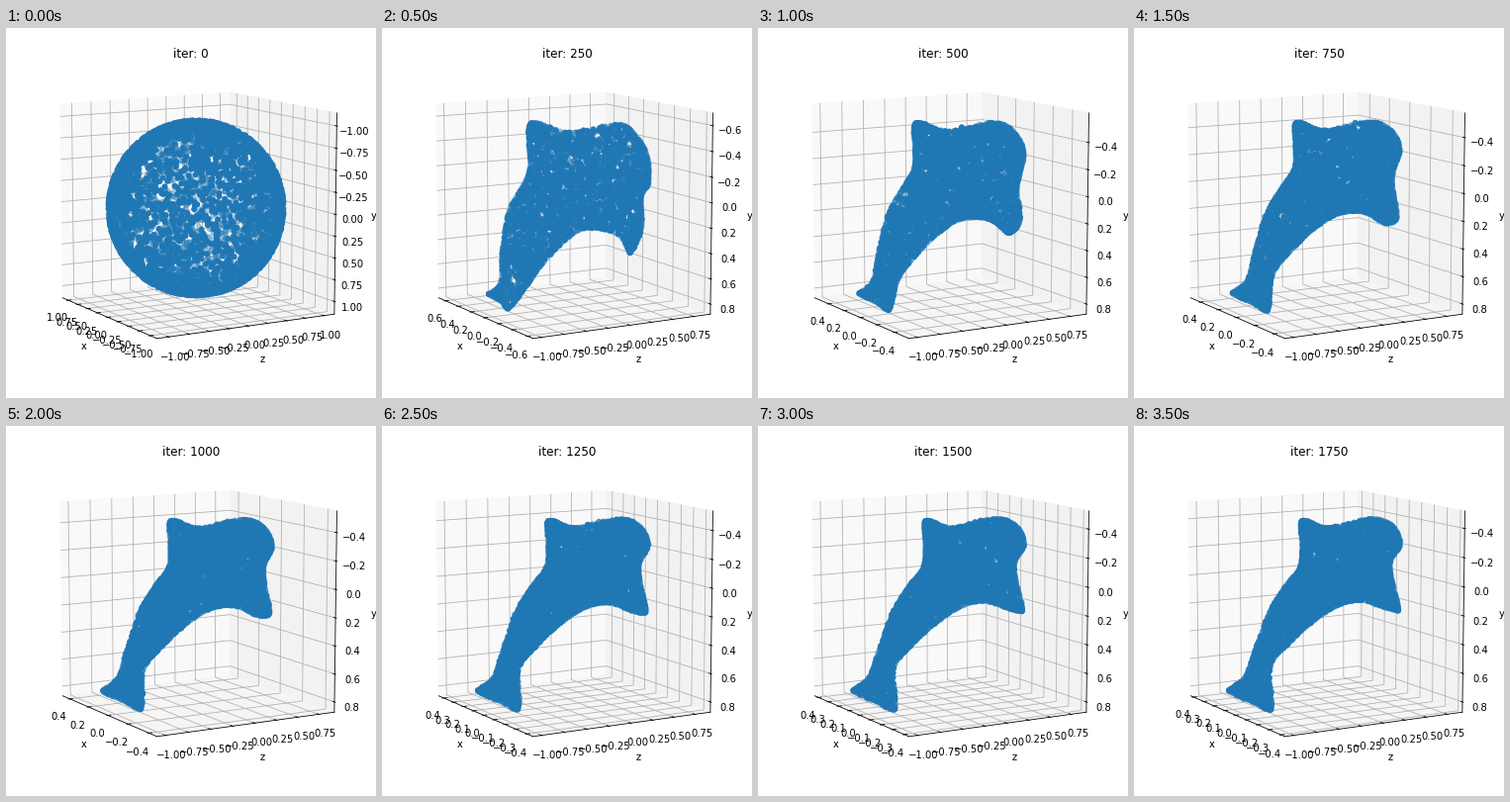
Animation, 374 px wide and 374 px high, one loop 4 s. Source, as a matplotlib script:

```python
import numpy as np
import matplotlib.pyplot as plt
from matplotlib.animation import FuncAnimation
from matplotlib.path import Path

SIZE, DPI, STEPS = 374, 72, 8
PAD, SCALE = 7.2, 360 / 0.185
EDGE = 0.5 + 1 / 48          # half side of the drawn box
DELTA = 1 / 12
BLUE = (31 / 255, 119 / 255, 180 / 255)
GRID = "#b0b0b0"

# limits of the x, z and y axes when the body first appears and when it settles
LIMITS_A = np.array([(-0.645, 0.68), (-1.045, 0.915), (-0.666, 0.849)])
LIMITS_B = np.array([(-0.415, 0.412), (-1.05, 0.893), (-0.491, 0.844)])

# key points of the body at the same two times, clockwise from the upper fin
BODY_A = np.array([
    (146, 99), (156, 93), (190, 103), (240, 95), (260, 109), (271, 130),
    (272, 158), (265, 171), (265, 204), (251, 230), (237, 211), (207, 205),
    (185, 218), (162, 243), (148, 263), (129, 286), (118, 278), (105, 269),
    (117, 257), (119, 225), (126, 184), (142, 155), (147, 140), (146, 120)])
BODY_B = np.array([
    (166, 97), (175, 93), (197, 100), (241, 91), (264, 100), (272, 120),
    (262, 138), (264, 158), (270, 187), (256, 187), (230, 179), (207, 184),
    (182, 200), (158, 222), (140, 245), (141, 288), (118, 281), (93, 268),
    (110, 252), (120, 225), (136, 184), (151, 160), (165, 142), (167, 120)])


def progress(step):
    """Settling of the body: fast at first, then ever slower."""
    return 1 - (1 - np.log(step) / np.log(STEPS - 1)) ** 1.4


def mix(a, b, t):
    return a + (b - a) * t


def view_axes(elev=190, azim=30):
    e, a = np.radians([elev, azim])
    n = np.array([np.cos(a) * np.cos(e), np.sin(a) * np.cos(e), np.sin(e)])
    u = np.cross([0, 0, -1], n)
    u /= np.linalg.norm(u)
    return u, np.cross(n, u), n


U, V, N = view_axes()


def project(points):
    """Perspective view of points in the unit cube centred on zero."""
    p = np.asarray(points, float)
    d = 10 - p @ N
    return np.stack([PAD + (p @ U / d + 0.095) * SCALE,
                     PAD + (p @ V / d + 0.095) * SCALE], -1), d


def line(points, color):
    q, _ = project(points)
    ax.plot(q[:, 0], q[:, 1], color=color, lw=0.8)


def label(point, text, va):
    q, _ = project(point)
    ax.text(q[0], q[1], text, fontsize=10, ha="center", va=va)


def pane(axis, side, gray):
    square = np.array([(-1, -1), (1, -1), (1, 1), (-1, 1)]) * EDGE
    q, _ = project(np.insert(square, axis, side * EDGE, axis=1))
    ax.fill(q[:, 0], q[:, 1], color=(gray,) * 3, lw=0.8)


def ticks(lo, hi):
    """Position along the box and text of every tick."""
    step = next(s for s in (0.1, 0.2, 0.25) if s >= (hi - lo) / 9)
    digits = 2 if step == 0.25 else 1
    for k in range(int(np.ceil(lo / step)), int(np.floor(hi / step)) + 1):
        text = f"{k * step:.{digits}f}".replace("-", "\u2212")
        yield (k * step - lo) / (hi - lo) - 0.5, text


def draw_axis(i, name, out, tick_dir, limits):
    """Axis i on the box edge that lies towards the signs in out."""
    out = np.array(out)
    middle = out * EDGE
    marks = list(ticks(*limits))
    for t, _ in marks:
        path = np.full((3, 3), EDGE)
        j, k = (n for n in range(3) if n != i)
        path[0, j] = path[2, k] = -EDGE
        path[:, i] = t
        line(path, GRID)
    ends = np.array([middle, middle])
    ends[:, i] = -EDGE, EDGE
    line(ends, "black")
    for t, text in marks:
        p = middle.copy()
        p[i] = t
        mark = np.array([p, p])
        mark[:, tick_dir] += np.array([0.1, -0.2]) * DELTA * out[tick_dir]
        line(mark, "black")
        label(p + out * 11.5 * DELTA / 15, text, "top")
    label(middle + out * 25 * DELTA / 15, name, "center")


def draw_box(limits):
    for axis, gray in enumerate((0.975, 0.95, 0.9625)):
        pane(axis, 1, gray)
    draw_axis(0, "x", (0, -1, 1), 1, limits[0])
    draw_axis(1, "z", (-1, 0, 1), 0, limits[1])
    draw_axis(2, "y", (-1, 1, 0), 0, limits[2])


def curve(points, parts=9):
    """Closed smooth curve through the points."""
    a, b, c, d = (np.roll(points, s, 0)[:, None] for s in (1, 0, -1, -2))
    t = (np.arange(parts) / parts)[None, :, None]
    q = 0.5 * (2 * b + (c - a) * t + (2 * a - 5 * b + 4 * c - d) * t ** 2
               + (3 * b - a - 3 * c + d) * t ** 3)
    return q.reshape(-1, 2)


def sphere_points(rng, n=5000):
    p = rng.normal(size=(n, 3))
    p /= np.linalg.norm(p, axis=1)[:, None]
    q, d = project(p / 2.2)
    order = np.argsort(-d)
    q, d = q[order], d[order]
    return q, 1 - 0.7 * (d - d.min()) / (d.max() - d.min())


def body_points(rng, t):
    edge = curve(mix(BODY_A, BODY_B, t))
    shape = Path(edge)
    tangent = np.roll(edge, -1, 0) - np.roll(edge, 1, 0)
    tangent /= np.linalg.norm(tangent, axis=1)[:, None]
    rim = edge + 3 * np.stack([-tangent[:, 1], tangent[:, 0]], -1)

    def inside(p, gap):
        dist = np.hypot(p[:, None, 0] - edge[:, 0], p[:, None, 1] - edge[:, 1])
        return p[shape.contains_points(p) & (dist.min(1) > gap)]

    fill = inside(rng.uniform(edge.min(0), edge.max(0), (14000, 2)), 2.8)
    fill = fill[:int(mix(3000, 3900, t))]
    q = rng.permutation(np.vstack([inside(rim, 2.5), fill]))
    return np.stack([q[:, 0], SIZE - q[:, 1]], -1), np.linspace(0.35, 1, len(q))


def draw(step):
    ax.cla()
    ax.set(xlim=(0, SIZE), ylim=(0, SIZE))
    ax.axis("off")
    rng = np.random.default_rng(7 + step)
    if step == 0:
        limits = [(-1.1, 1.1)] * 3
        q, alpha = sphere_points(rng)
    else:
        t = progress(step)
        limits = mix(LIMITS_A, LIMITS_B, t)
        q, alpha = body_points(rng, t)
    draw_box(limits)
    colors = np.column_stack([np.tile(BLUE, (len(q), 1)), alpha])
    ax.scatter(q[:, 0], q[:, 1], s=20, c=colors, linewidths=1.5, zorder=5)
    ax.text(PAD + 180, PAD + 0.92 * 360 + 6, f"iter: {250 * step}",
            fontsize=12, ha="center", va="baseline")
    return []


plt.rcParams["font.family"] = "DejaVu Sans"
fig = plt.figure(figsize=(SIZE / DPI, SIZE / DPI), dpi=DPI, facecolor="white")
ax = fig.add_axes([0, 0, 1, 1])
anim = FuncAnimation(fig, draw, frames=STEPS, interval=500, repeat=True,
                     repeat_delay=0, init_func=lambda: [])
plt.show()
```
